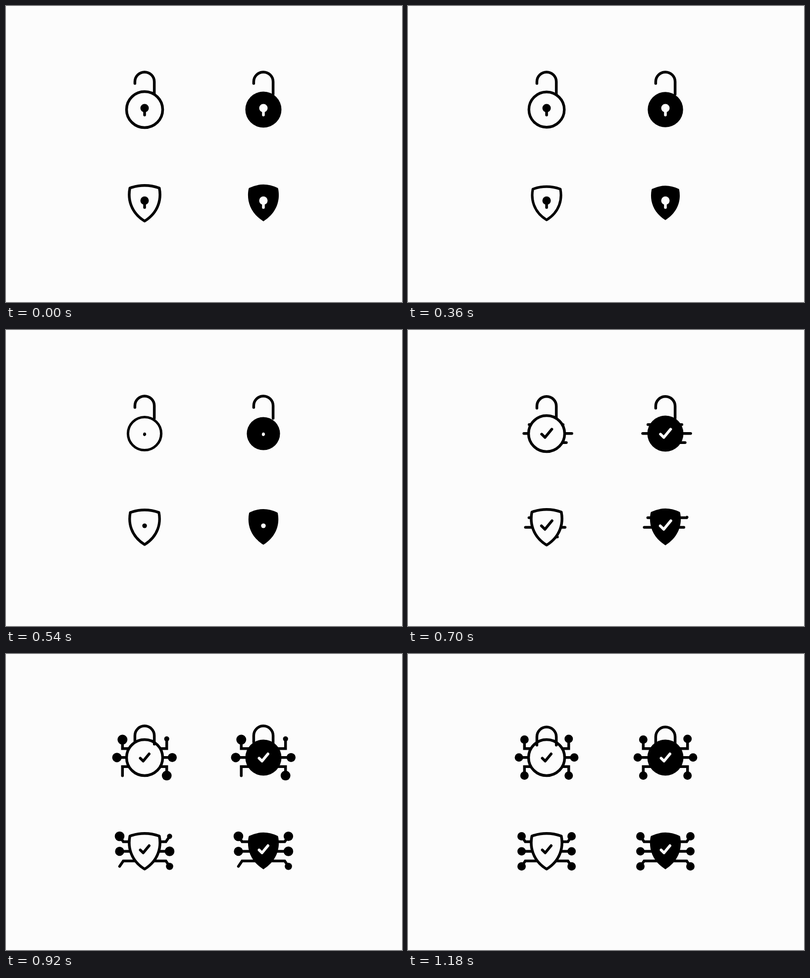
An HTML page without scripts for the animation above (1400 ms loop, 800 by 600 pixels).

```html
<!DOCTYPE html>
<html lang="en">
<head>
<meta charset="utf-8">
<title>Security icons</title>
<style>
  /* one clock in milliseconds drives every part */
  @property --t { syntax: "<number>"; inherits: true; initial-value: 0; }

  html, body { margin: 0; width: 100%; height: 100%; overflow: hidden; background: #fcfcfc; }

  svg {
    --ink: #000;
    --paper: #fcfcfc;
    display: block; width: 100vw; height: 100vh;
    fill: none; stroke-width: 5.5px; stroke-linecap: round;
    animation: clock 1.4s linear infinite;
  }
  @keyframes clock { from { --t: 0; } to { --t: 1400; } }

  .line { --mark: var(--ink); --fill: var(--paper); --edge: var(--ink); }
  .solid { --mark: var(--paper); --fill: var(--ink); --edge: none; }
  .lock { --press: 320; --swap: 530; }
  .shield { --press: 280; --swap: 580; }

  /* body: squeeze and release */
  .body {
    --u: clamp(0, (var(--t) - var(--press)) / 160, 1);
    --v: clamp(0, (var(--t) - var(--press) - 160) / 145, 1);
    fill: var(--fill); stroke: var(--edge); stroke-linejoin: round;
    transform: scale(calc(1 - .13 * (var(--u) * var(--u) * (3 - 2 * var(--u))
                                   - var(--v) * var(--v) * (3 - 2 * var(--v)))));
  }

  .shackle { stroke: var(--ink); animation: shut 1.4s infinite; }
  @keyframes shut {
    0%, 20% {
      d: path("M-19.6 -53V-56.5A19.6 19.6 0 0 1 19.6 -56.5V-31");
      animation-timing-function: ease-in;
    }
    25.714% {
      d: path("M-19.6 -37V-47A19.6 19.6 0 0 1 19.6 -47V-29.5");
      animation-timing-function: ease-out;
    }
    34.286% {
      d: path("M-19.6 -25V-42A19.6 19.6 0 0 1 19.6 -42V-25");
      animation-timing-function: ease-in-out;
    }
    44.286%, 100% { d: path("M-19.6 -30.9V-49.5A19.6 19.6 0 0 1 19.6 -49.5V-30.9"); }
  }

  /* keyhole shrinks to a dot, the tick grows out of it */
  .key {
    --u: clamp(0, (var(--t) - var(--swap) + 100) / 100, 1);
    --e: calc(var(--u) * var(--u) * (3 - 2 * var(--u)));
    opacity: clamp(0, var(--swap) + 15 - var(--t), 1);
    transform: translateY(calc(3.5px * var(--e)));
  }
  .head { fill: var(--mark); r: calc(8.5px - 5.75px * var(--e)); }
  .stem {
    stroke: var(--mark); stroke-dasharray: 14 40;
    stroke-dashoffset: calc(14px * clamp(0, 2 * var(--u), 1));
  }
  .tick {
    --u: clamp(.02, (var(--t) - var(--swap)) / 110, 1);
    --v: clamp(0, (var(--t) - var(--swap) - 110) / 190, 1);
    stroke: var(--mark); stroke-linejoin: round; vector-effect: non-scaling-stroke;
    opacity: clamp(0, var(--t) - var(--swap), 1);
    transform: scale(calc(1.2 * var(--u) * var(--u) * (3 - 2 * var(--u))
                        - .2 * var(--v) * var(--v) * (3 - 2 * var(--v))));
  }

  /* wire grows from --a to --b, node pops at --s */
  .wire {
    stroke: var(--ink);
    stroke-dasharray: calc(var(--l) * 1px) 99px;
    stroke-dashoffset: calc(var(--l) * 1px * (1 - clamp(0, (var(--t) - var(--a)) / (var(--b) - var(--a)), 1)));
  }
  .node {
    --u: clamp(0, (var(--t) - var(--s)) / 100, 1);
    --v: clamp(0, (var(--t) - var(--s) - 100) / 180, 1);
    fill: var(--ink);
    r: calc(10px * var(--u) * var(--u) * (3 - 2 * var(--u))
          - 1.5px * var(--v) * var(--v) * (3 - 2 * var(--v)));
  }
  .bent { cy: calc(var(--y, -36.4) * 1px); }
</style>
</head>
<body>
<svg viewBox="0 0 800 600">
  <defs>
    <g id="key" class="key">
      <path class="stem" d="M0 0V14"/>
      <circle class="head"/>
    </g>
    <path id="tick" class="tick" d="M-8.7 -.8L-2.8 5L9.2 -9.5"/>

    <!-- arms point right and up -->
    <g id="lock-bent">
      <path class="wire" style="--l:41.1" d="M22 -18.3H44.7V-36.7"/>
      <circle class="node bent" cx="44.7"/>
    </g>
    <g id="lock-mid">
      <path class="wire" style="--l:34" d="M22 -.2H56"/>
      <circle class="node" cx="55.9" cy="-.2"/>
    </g>
    <g id="shield-top">
      <path class="wire" style="--l:36.3" d="M20 -19.5H43L50.5 -30.5"/>
      <circle class="node" cx="50.5" cy="-30.5"/>
    </g>
    <g id="shield-mid">
      <path class="wire" style="--l:30.5" d="M20 0H50.5"/>
      <circle class="node" cx="50.5"/>
    </g>
    <g id="shield-low">
      <path class="wire" style="--l:46.3" d="M10 19.5H43L50.5 30.5"/>
      <circle class="node" cx="50.5" cy="30.5"/>
    </g>

    <g id="lock">
      <use href="#lock-bent" style="--a:624;--b:904;--s:870;--y:-38"/>
      <use href="#lock-mid" style="--a:620;--b:715;--s:720"/>
      <use href="#lock-bent" style="--a:625;--b:800;--s:790" transform="scale(1 -1)"/>
      <use href="#lock-bent" style="--a:612;--b:887;--s:820" transform="scale(-1 1)"/>
      <use href="#lock-mid" style="--a:620;--b:735;--s:758" transform="scale(-1 1)"/>
      <use href="#lock-bent" style="--a:var(--low);--b:920;--s:900" transform="scale(-1)"/>
      <circle class="body" r="36.5"/>
      <path class="shackle" d="M-19.6 -53V-56.5A19.6 19.6 0 0 1 19.6 -56.5V-31"/>
      <use href="#key" y="-3"/>
      <use href="#tick" y="2"/>
    </g>

    <g id="shield-arms">
      <use href="#shield-top" style="--a:var(--top);--b:var(--top-end);--s:var(--top-pop)"/>
      <use href="#shield-mid" style="--a:604;--b:775;--s:773"/>
      <use href="#shield-low" style="--a:var(--right);--b:867;--s:855"/>
      <use href="#shield-top" style="--a:600;--b:835;--s:830" transform="scale(-1 1)"/>
      <use href="#shield-mid" style="--a:610;--b:732;--s:725" transform="scale(-1 1)"/>
      <use href="#shield-low" style="--a:var(--low);--b:920;--s:900" transform="scale(-1 1)"/>
    </g>
    <g id="shield-mark">
      <use href="#key" y="-5.5"/>
      <use href="#tick" y="-2"/>
    </g>
  </defs>

  <g class="lock line" style="--low:725" transform="translate(280 210)">
    <use href="#lock"/>
  </g>
  <g class="lock solid" style="--low:750" transform="translate(520 210)">
    <use href="#lock"/>
  </g>

  <g class="shield line" style="--top:650;--top-end:900;--top-pop:870;--right:644;--low:760" transform="translate(280 400)">
    <use href="#shield-arms"/>
    <path class="body" d="M-29.7 -31Q0 -41.6 29.7 -31C34 -10 29 18 0 36C-29 18 -34 -10 -29.7 -31Z"/>
    <use href="#shield-mark"/>
  </g>
  <g class="shield solid" style="--top:582;--top-end:760;--top-pop:760;--right:680;--low:790" transform="translate(520 400)">
    <use href="#shield-arms"/>
    <path class="body" d="M-28.7 -31.2Q0 -45.2 28.7 -31.2Q29.6 -30.7 29.8 -29.6C34 -9 29 18 0 36.4C-29 18 -34 -9 -29.8 -29.6Q-29.6 -30.7 -28.7 -31.2Z"/>
    <use href="#shield-mark"/>
  </g>
</svg>
</body>
</html>
```
